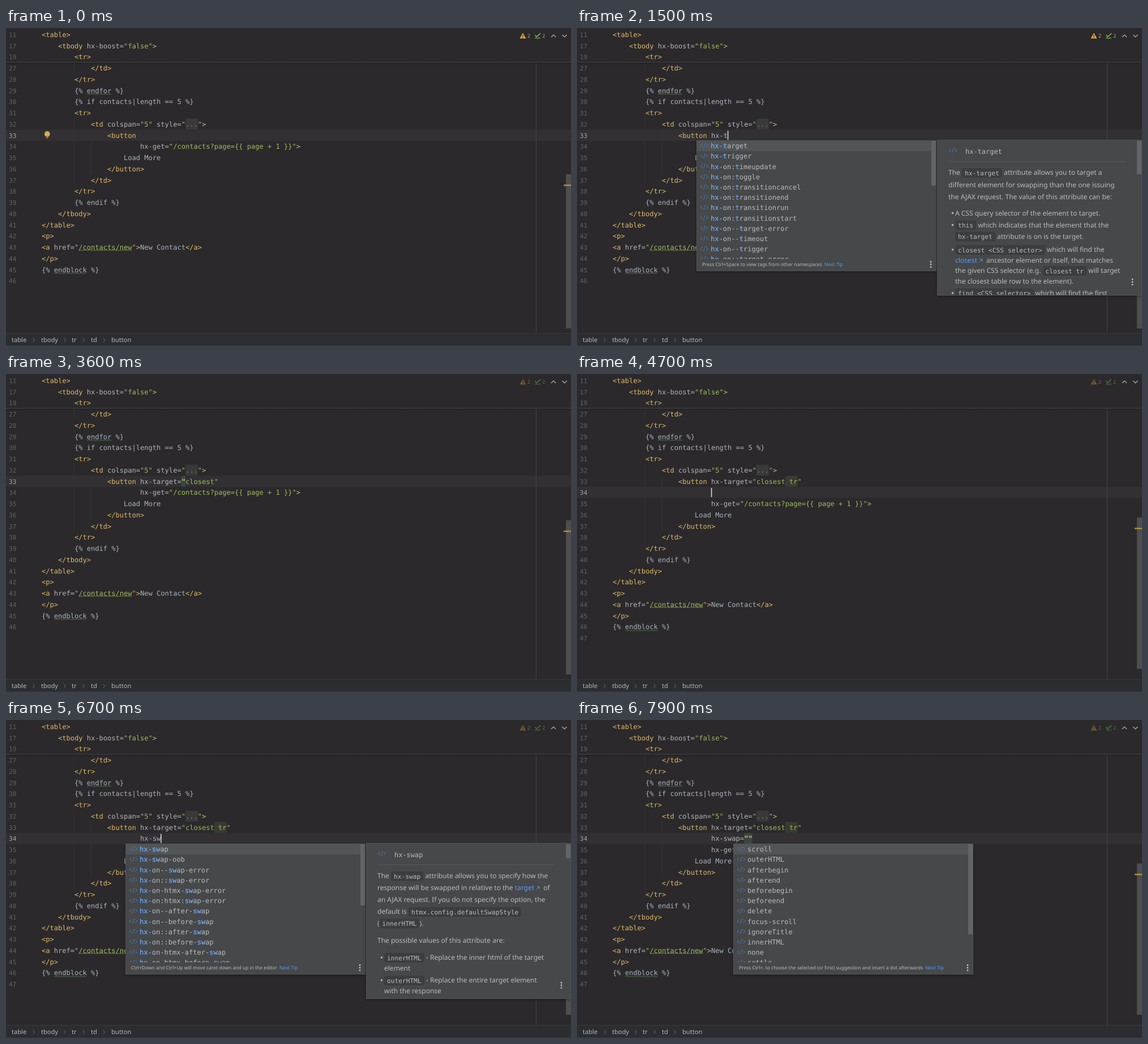
Recreate the animation shown at these times as an HTML page with a canvas. Size 998x561 px, loop 8000 ms.

```html
<!DOCTYPE html>
<html lang="en">
<head>
<meta charset="utf-8">
<title>Editor completion</title>
<style>
html, body { margin: 0; width: 100%; height: 100%; overflow: hidden; background: #2b292b; }
canvas { display: block; width: 998px; height: 561px; }
</style>
</head>
<body>
<canvas id="stage"></canvas>
<script>
const W = 998, H = 561, LOOP = 8000;
const canvas = document.getElementById('stage');
const ratio = window.devicePixelRatio || 1;
canvas.width = W * ratio;
canvas.height = H * ratio;
const ctx = canvas.getContext('2d');
ctx.scale(ratio, ratio);
ctx.textRendering = 'geometricPrecision';

const MONO = '"DejaVu Sans Mono", monospace';
const SANS = '"Noto Sans", "Open Sans", sans-serif';
const PITCH = 7.254, LEFT = 63, ROW = 19.75;
const C = {
  bg: '#2b292b', band: '#323032', text: '#a9b4c0', tag: '#dfb96a', attr: '#b6b6b6',
  str: '#a0bb60', blue: '#589df6', popup: '#46484a', ui: '#bbbbbb', dim: '#606264'
};

const colX = col => LEFT + col * PITCH;
const rowMid = row => 11.5 + row * ROW;

function rect(x, y, w, h, color) {
  ctx.fillStyle = color;
  ctx.fillRect(x, y, w, h);
}

function path(points, color, width = 1) {
  ctx.beginPath();
  for (let i = 0; i < points.length; i += 2) ctx.lineTo(points[i], points[i + 1]);
  ctx.strokeStyle = color;
  ctx.lineWidth = width;
  ctx.stroke();
}

function dot(x, y, r, color) {
  ctx.beginPath();
  ctx.arc(x, y, r, 0, 7);
  ctx.fillStyle = color;
  ctx.fill();
}

function label(s, x, y, size, color) {
  ctx.font = `${size}px ${SANS}`;
  ctx.fillStyle = color;
  ctx.fillText(s, x, y);
  return x + ctx.measureText(s).width;
}

// Monospaced text on a fixed grid; y is the middle of the line.
function mono(s, x, mid, color, pitch = PITCH, bold = false) {
  ctx.font = `${bold ? 'bold ' : ''}${pitch / 0.602}px ${MONO}`;
  ctx.fillStyle = color;
  for (const ch of s) {
    if (ch !== ' ') ctx.fillText(ch, x, mid + 4.3);
    x += pitch;
  }
  return x;
}

function wave(x, end, y) {
  const pts = [];
  for (let i = 0; x <= end; i++, x += 1.8) pts.push(x, y + (i % 2 ? 0.7 : -0.7));
  path(pts, '#62875c', 0.8);
}

function kebab(x, y) {
  for (const d of [-4.6, 0, 4.6]) dot(x, y + d, 1.4, '#c4c6c8');
}

function tagIcon(x, y) {
  const color = '#4a78ad';
  path([x + 4, y - 3, x, y, x + 4, y + 3], color);
  path([x + 8.4, y - 4.5, x + 5.6, y + 4.5], color);
  path([x + 10, y - 3, x + 14, y, x + 10, y + 3], color);
}

// ---- code ----
const head = [
  [0, '<table>'], [4, '<tbody hx-boost="false">'], [8, '<tr>'], [12, '</td>'], [8, '</tr>'],
  [8, '{% endfor %}'], [8, '{% if contacts|length == 5 %}'], [8, '<tr>'],
  [12, '<td colspan="5" style="...">']
];
const tail = [
  [24, 'hx-get="/contacts?page={{ page + 1 }}">'], [20, 'Load More'], [16, '</button>'],
  [12, '</td>'], [8, '</tr>'], [8, '{% endif %}'], [4, '</tbody>'], [0, '</table>'],
  [0, '<p>'], [0, '<a href="/contacts/new">New Contact</a>'], [0, '</p>'], [0, '{% endblock %}'], [0, '']
];
const TOKEN = /(<\/?\w+|>)|("[^".]*"|")|([\w-]+(?==))|(\.\.\.)|[^<>".]/g;

function codeLine(col, s, row) {
  const y = rowMid(row);
  for (const m of s.matchAll(TOKEN)) {
    const color = m[1] ? C.tag : m[2] ? C.str : m[3] ? C.attr : m[4] ? '#7d8270' : C.text;
    const x = colX(col + m.index);
    if (m[4]) rect(x, y - 9.5, PITCH * 3, 19, '#3a393a');
    mono(m[0], x, y, color);
  }
  const word = s.match(/endfor|endblock|\/contacts\/new/);
  if (word) {
    const x = colX(col + word.index), end = x + word[0].length * PITCH;
    if (word[0][0] === '/') path([x, y + 5.3, end, y + 5.3], '#86a052', 0.8);
    else wave(x, end, y + 6.5);
  }
}

function quoteMarks(col, s, row) {
  const open = s.indexOf('"');
  if (open < 0) return;
  const n = s[open + 1] === '"' ? 2 : 1;
  const x = colX(col + open), y = rowMid(row);
  rect(x, y - 9.3, n * PITCH, 18.6, '#3b4642');
  mono('"'.repeat(n), x, y, '#c3d66a', PITCH, true);
}

// ---- completion lists ----
const TIP = {
  space: 'Press Ctrl+Space to view tags from other namespaces',
  enter: 'Press Enter to insert, Tab to replace',
  move: 'Ctrl+Down and Ctrl+Up will move caret down and up in the editor',
  dotted: 'Press Ctrl+. to choose the selected (or first) suggestion and insert a dot afterwards'
};
const on = (sep, names) => names.split(' ').map(n => 'hx-on' + sep + n);
const hxItems = ['hx-on:click', 'hx-select', 'hx-swap', 'hx-boost',
  ...on(':', 'abort auxclick beforeinput beforematch blur canplay canplaythrough change')];
const lists = {
  hxFirst: { col: 24, items: hxItems, keys: ['hx-'], tip: TIP.space, thumb: 25 },
  hxT: {
    col: 24, keys: ['hx-', 't'], tip: TIP.space, thumb: 79,
    items: ['hx-target', 'hx-trigger',
      ...on(':', 'timeupdate toggle transitioncancel transitionend transitionrun transitionstart'),
      ...on('--', 'target-error timeout trigger'), 'hx-on::target-error']
  },
  values: { col: 35, items: ['closest', 'find', 'next', 'previous', 'this'], keys: [], tip: TIP.enter },
  closest: { col: 35, items: ['closest'], keys: ['c'], tip: TIP.enter },
  tags: {
    col: 43, keys: ['t'], tip: TIP.enter, thumb: 160,
    items: 'table tbody td template textarea tfoot th thead time title tr track'.split(' ')
  },
  tr: { col: 43, items: ['tr', 'track'], keys: ['tr'], tip: TIP.enter },
  hx: { col: 24, items: hxItems, keys: ['hx-'], tip: TIP.move, thumb: 25 },
  hxS: {
    col: 24, keys: ['hx-', 's'], tip: TIP.move, thumb: 50,
    items: ['hx-select', 'hx-swap', 'hx-select-oob', 'hx-swap-oob',
      ...on(':', 'scroll scrollend seeked seeking select stalled submit suspend')]
  },
  hxSw: {
    col: 24, keys: ['hx-', 'sw'], tip: TIP.move, thumb: 108,
    items: ['hx-swap', 'hx-swap-oob', ...on('', '--swap-error ::swap-error -htmx-swap-error ' +
      ':htmx:swap-error --after-swap --before-swap ::after-swap ::before-swap -htmx-after-swap -htmx-before-swap')]
  },
  swap: {
    col: 33, keys: [], tip: TIP.dotted, thumb: 159,
    items: ('scroll outerHTML afterbegin afterend beforebegin beforeend delete ' +
      'focus-scroll ignoreTitle innerHTML none settle').split(' ')
  }
};

function panel(x, y, w, h) {
  ctx.save();
  ctx.shadowColor = 'rgba(0,0,0,.35)';
  ctx.shadowBlur = 5 * ratio;
  ctx.shadowOffsetY = 1.5 * ratio;
  rect(x, y, w, h, C.popup);
  ctx.restore();
  ctx.strokeStyle = '#515456';
  ctx.lineWidth = 1;
  ctx.strokeRect(x + 0.5, y + 0.5, w - 1, h - 1);
}

function drawList(list, top) {
  const pitch = 18.18, x = Math.round(colX(list.col) - 26), w = 424;
  const body = Math.min(list.items.length, 11.5) * pitch;
  const h = Math.round(body + 22);
  panel(x, top, w, h);
  rect(x + 1, top + 1, w - 2, pitch, '#525558');
  ctx.save();
  ctx.beginPath();
  ctx.rect(x, top, w, body + 0.5);
  ctx.clip();
  list.items.forEach((item, i) => {
    const y = top + 10 + i * pitch;
    tagIcon(x + 7, y - 0.5);
    mono(item, x + 25, y, C.ui);
    let from = 0;
    for (const key of list.keys) {
      const at = item.indexOf(key, from);
      if (at < 0) continue;
      from = at + key.length;
      mono(key, x + 25 + at * PITCH, y, C.blue);
    }
  });
  ctx.restore();
  if (list.thumb) rect(x + w - 9, top + 1, 8, list.thumb, '#626567');
  const mid = top + h - 12;
  const end = label(list.tip, x + 10, mid + 3, 8.45, C.ui);
  label('Next Tip', end + 4, mid + 3, 8.45, C.blue);
  kebab(x + w - 10, mid);
}

// ---- documentation: `code`, ~linked code~, {link} ----
const docs = {
  target: {
    title: 'hx-target', icon: true, thumb: 59, lines: [
      [656, 58, 'The `hx-target` attribute allows you to target a'],
      [656, 79.5, 'different element for swapping than the one issuing'],
      [656, 100.5, 'the AJAX request. The value of this attribute can be:'],
      [668, 129.5, 'A CSS query selector of the element to target.', true],
      [668, 150.5, '`this` which indicates that the element that the', true],
      [668, 170.5, '`hx-target` attribute is on is the target.'],
      [668, 194, '`closest <CSS selector>` which will find the', true],
      [668, 213, '{closest} ancestor element or itself, that matches'],
      [668, 231, 'the given CSS selector (e.g. `closest tr` will target'],
      [668, 249.5, 'the closest table row to the element).'],
      [668, 270.5, '`find <CSS selector>` which will find the first', true]
    ]
  },
  click: {
    title: 'click', thumb: 177, lines: [
      ...['An element receives a `click` event when any of the',
        'following occurs: If the button is pressed on one',
        'element and the pointer is moved outside the element',
        'before the button is released, the event is fired on the',
        'most specific ancestor element that contained both',
        'elements. `click` fires after both the ~mousedown~',
        'and ~mouseup~ events have fired, in that order. The',
        'event is a device-independent event — meaning it can',
        'be activated by touch, keyboard, mouse, and any',
        'other mechanism provided by assistive technology.'
      ].map((s, i) => [656, 55.5 + i * 20.94, s]),
      [656, 273.5, 'Supported by:', false, '#8b8d8f'],
      [738, 272.5, 'Plovix, Plovix Handheld, Wend']
    ]
  },
  swap: {
    title: 'hx-swap', icon: true, thumb: 25, lines: [
      [656, 58, 'The `hx-swap` attribute allows you to specify how the'],
      [656, 79, 'response will be swapped in relative to the {target} of'],
      [656, 100, 'an AJAX request. If you do not specify the option, the'],
      [656, 121, 'default is `htmx.config.defaultSwapStyle`'],
      [656, 141.5, '(`innerHTML`).'],
      [656, 172, 'The possible values of this attribute are:'],
      [668, 202, '`innerHTML` - Replace the inner html of the target', true],
      [668, 221, 'element'],
      [668, 242, '`outerHTML` - Replace the entire target element', true],
      [668, 261, 'with the response']
    ]
  }
};

function docLine(x, y, s, color) {
  for (const part of s.match(/`[^`]+`|~[^~]+~|\{[^}]+\}|[^`~{]+/g)) {
    const kind = part[0], inner = part.slice(1, -1);
    if (kind === '`' || kind === '~') {
      const w = inner.length * 6.76 + 10;
      ctx.beginPath();
      ctx.roundRect(x, y - 8, w, 17, 4);
      ctx.fillStyle = '#3b3d3f';
      ctx.fill();
      mono(inner, x + 5, y + 0.5, kind === '~' ? C.blue : C.ui, 6.76);
      x += w;
    } else if (kind === '{') {
      x = label(inner, x, y + 4.2, 12, C.blue) + 4;
      path([x, y + 3, x + 5, y - 2], C.blue);
      path([x + 1, y - 2, x + 5, y - 2, x + 5, y + 2], C.blue);
      x += 9;
    } else {
      x = label(part, x, y + 4.2, 12, color);
    }
  }
}

function drawDoc(doc, top) {
  const x = 636, h = 275;
  panel(x, top, W - x, h);
  ctx.save();
  ctx.beginPath();
  ctx.rect(x, top, W - x, h - 1);
  ctx.clip();
  if (doc.icon) tagIcon(657, top + 18.5);
  mono(doc.title, doc.icon ? 686 : 656, top + (doc.icon ? 21 : 19), C.ui, 7.2);
  rect(656, top + (doc.icon ? 38 : 36), 312, 1, '#55585a');
  for (const [lx, dy, s, bullet, color] of doc.lines) {
    if (bullet) dot(663.5, top + dy, 1.7, C.ui);
    docLine(lx, top + dy, s, color || C.ui);
  }
  ctx.restore();
  rect(989, top + 2, 8, doc.thumb, '#626567');
  kebab(981, top + h - 24);
}

// ---- timeline: time, first line, second line, list, doc ("|" is the caret) ----
const T33 = ' hx-target="closest tr"';
const steps = [
  [-500, '|'],
  [300, ' |'],
  [600, ' h|'],
  [800, ' hx|', null, 'hxFirst'],
  [1100, ' hx-|', null, 'hxFirst', 'click'],
  [1400, ' hx-t|', null, 'hxT', 'target'],
  [1700, ' hx-target="|"'],
  [1900, ' hx-target="|"', null, 'values'],
  [2400, ' hx-target="c|"', null, 'closest'],
  [2900, ' hx-target="closest|"'],
  [3700, ' hx-target="closest |"'],
  [3900, ' hx-target="closest t|"', null, 'tags'],
  [4200, ' hx-target="closest tr|"', null, 'tr'],
  [4400, ' hx-target="closest tr|"'],
  [4600, T33, '|'],
  [5200, T33, 'h|'],
  [5400, T33, 'hx|', 'hx'],
  [5800, T33, 'hx-|', 'hx', 'click'],
  [6450, T33, 'hx-s|', 'hxS', 'click'],
  [6600, T33, 'hx-sw|', 'hxSw', 'swap'],
  [7000, T33, 'hx-swap="|"'],
  [7100, T33, 'hx-swap="|"', 'swap']
];

function drawStatus(dim) {
  const warn = dim ? '#74592a' : '#d9a343', ok = dim ? '#456a38' : '#6aa84f';
  const num = dim ? '#6a6a6b' : '#a2a4a6';
  ctx.beginPath();
  ctx.moveTo(913, 8.5);
  ctx.lineTo(918.5, 18.5);
  ctx.lineTo(907.5, 18.5);
  ctx.closePath();
  ctx.fillStyle = warn;
  ctx.fill();
  rect(912.3, 12, 1.4, 3.2, C.bg);
  rect(912.3, 16, 1.4, 1.3, C.bg);
  label('2', 921, 17.3, 9, num);
  path([934.5, 12.5, 937.5, 15.5, 944, 9.5], ok, 1.8);
  path([934, 18.5, 936.5, 17, 939, 19, 941.5, 17, 944, 18.5], ok, 1.2);
  label('2', 947.3, 17.3, 9, num);
  path([963, 16, 967, 12, 971, 16], '#b4b6b8', 1.2);
  path([982.5, 12, 986.5, 16, 990.5, 12], '#b4b6b8', 1.2);
}

function drawBar() {
  rect(0, 538, W, 23, '#2b2d30');
  rect(0, 538, W, 1, '#38393c');
  rect(0, 560, W, 1, '#38393c');
  const crumbs = [['table', 10], ['tbody', 62], ['tr', 116], ['td', 150], ['button', 186]];
  crumbs.forEach(([s, x], i) => {
    const end = label(s, x, 554, 11.1, '#b4b7ba');
    if (i === 4) return;
    const mid = (end + crumbs[i + 1][1]) / 2;
    path([mid - 1.8, 547, mid + 1.5, 550.5, mid - 1.8, 554], '#6f7274');
  });
}

function draw(t) {
  const at = steps.findLastIndex(s => s[0] <= t);
  const [, first, second, ...popups] = steps[at];
  const [list, doc] = popups;
  const added = second != null;
  const row = added ? 10 : 9;
  const lines = [...head, [16, '<button' + first.replace('|', '')]];
  if (added) lines.push([24, second.replace('|', '')]);
  lines.push(...tail);

  rect(0, 0, W, H, C.bg);
  rect(0, rowMid(row) - 9.9, W, 19.75, C.band);
  const shift = added ? ROW : 0;
  rect(119.5, 62, 1, 18, '#363436');
  rect(119.5, 160, 1, 118 + shift, '#363436');
  rect(149.5, 180, 1, 78 + shift, '#363436');
  rect(936, 61, 1, 477, '#454445');

  const frag = first.indexOf('closest ');
  if (frag > 0) {
    const len = first.replace('|', '').replace(/"$/, '').length - frag - 7;
    rect(colX(23 + frag + 7), rowMid(9) - 9.5, len * PITCH, 19, '#383b33');
  }
  lines.forEach(([col, s], i) => {
    const no = String(i < 3 ? [11, 17, 19][i] : 24 + i);
    mono(no, 18.3 - no.length * 6.65, rowMid(i), i === row ? '#a6a6a6' : C.dim, 6.65);
    codeLine(col, s, i);
  });

  const sticky = ctx.createLinearGradient(0, 61, 0, 65);
  sticky.addColorStop(0, 'rgba(0,0,0,.2)');
  sticky.addColorStop(1, 'rgba(0,0,0,0)');
  rect(0, 61, W, 4, sticky);
  rect(0, 60, W, 1, '#444345');

  const active = added ? second : first, base = added ? 24 : 23;
  if (active.includes('"')) quoteMarks(base, active.replace('|', ''), row);
  const since = t - Math.max(...steps.slice(0, at + 1).filter((s, i) =>
    !i || s[1] !== steps[i - 1][1] || s[2] !== steps[i - 1][2]).map(s => s[0]));
  if (since % 1000 < 500 && at > 0) {
    rect(colX(base + active.indexOf('|')) - 0.3, rowMid(row) - 8, 1.6, 16, '#d6d6d6');
  }

  if (t < 300) {
    dot(72.8, 187, 4.9, '#d9a95a');
    rect(70.8, 190.5, 4, 2, '#c0954f');
    rect(71, 193.3, 3.6, 1.2, '#98999a');
  }

  drawStatus(t >= 2000);
  rect(989, added ? 253 : 258, 9, added ? 267 : 272, '#4e4e4f');
  rect(985, added ? 271.5 : 276.5, 13, 2, '#c8a038');
  drawBar();

  const top = added ? 218 : 198;
  if (list) drawList(lists[list], top);
  if (doc) drawDoc(docs[doc], top - 1);
}

const start = performance.now();
function tick() {
  draw((performance.now() - start) % LOOP);
  requestAnimationFrame(tick);
}
tick();
</script>
</body>
</html>
```
